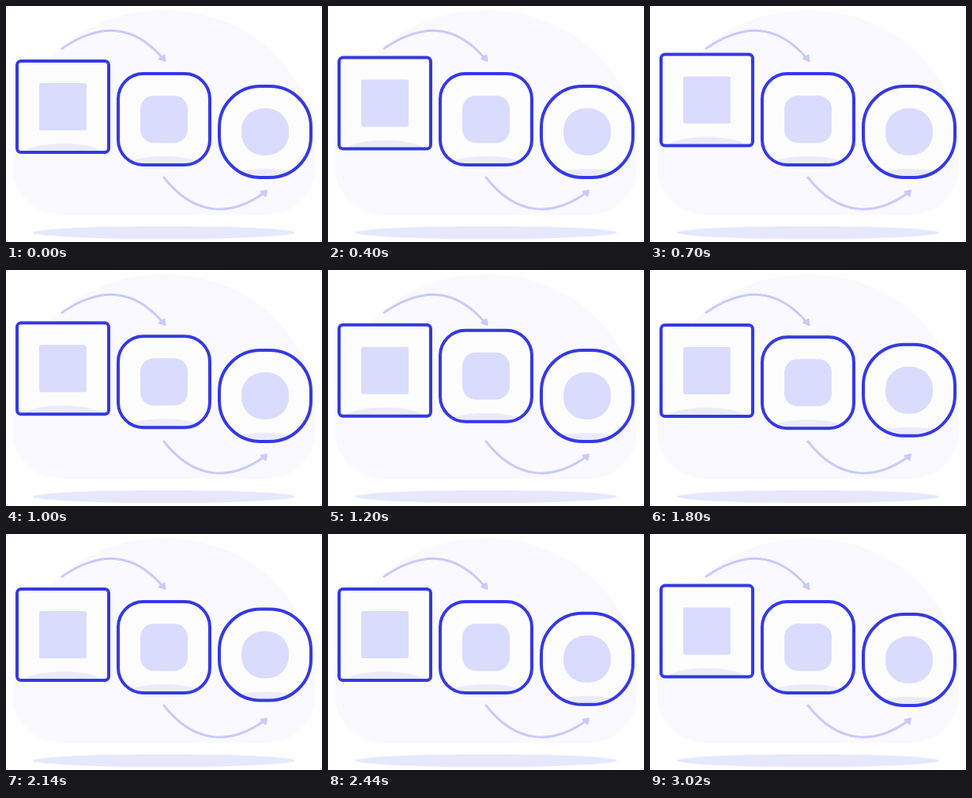
Recreate the animation shown at these times as an HTML page with a canvas. Size 400 px wide and 300 px high, loop 3.04 s.

```html
<!DOCTYPE html>
<html lang="en">
<head>
<meta charset="utf-8">
<title>Corner radius steps</title>
<style>
  html, body { margin: 0; width: 100%; height: 100%; overflow: hidden; background: #fff; }
  canvas { display: block; }
</style>
</head>
<body>
<canvas width="400" height="300"></canvas>
<script>
const ctx = document.querySelector('canvas').getContext('2d');

const LOOP = 3040, CYCLE = 2620, STAGGER = 667;
const RISE = 222, PEAK = 608, REST = 1298, LIFT = 10;

const tiles = [
  { x: 12, y: 68, outer: 5, inner: 3 },
  { x: 140, y: 84, outer: 32, inner: 17 },
  { x: 268, y: 100, outer: 52, inner: 28 }
];

function bezier(x1, y1, x2, y2) {
  const at = (a, b, s) => 3 * a * s * (1 - s) ** 2 + 3 * b * s * s * (1 - s) + s ** 3;
  return x => {
    let lo = 0, hi = 1;
    for (let i = 0; i < 24; i++) {
      const mid = (lo + hi) / 2;
      if (at(x1, x2, mid) < x) lo = mid; else hi = mid;
    }
    return at(y1, y2, lo);
  };
}
const easeUp = bezier(0.42, 0, 0.58, 1);
const easeDown = bezier(0.33, 0.3, 0.6, 1);

function lift(t) {
  if (t < RISE || t > REST) return 0;
  if (t < PEAK) return LIFT * easeUp((t - RISE) / (PEAK - RISE));
  return LIFT * (1 - easeDown((t - PEAK) / (REST - PEAK)));
}

function fill(path, color) {
  ctx.fillStyle = color;
  ctx.fill(path);
}

function ellipse(x, y, rx, ry) {
  const p = new Path2D();
  p.ellipse(x, y, rx, ry, 0, 0, 2 * Math.PI);
  return p;
}

function square(x, y, size, r) {
  const p = new Path2D();
  p.roundRect(x, y, size, size, r);
  return p;
}

const blob = new Path2D(
  'M9 180A191 175 0 0 1 391 180V205A60 60 0 0 1 331 265H69A60 60 0 0 1 9 205Z');
const arrows = [
  ['M71 54C118 22 160 22 198 66', 'M201.5 70L194 67L200.5 62.5Z'],
  ['M200 218C238 267 284 268 326 238', 'M330 234.5L322.5 236L328.5 241.5Z']
].map(pair => pair.map(d => new Path2D(d)));

function drawArrow([line, head]) {
  ctx.strokeStyle = '#c9cafc';
  ctx.lineCap = ctx.lineJoin = 'round';
  ctx.lineWidth = 3;
  ctx.stroke(line);
  ctx.lineWidth = 2;
  ctx.stroke(head);
  fill(head, '#c9cafc');
}

function drawTile({ x, y, outer, inner }, up) {
  const frame = square(2, 2, 116, outer);
  ctx.save();
  ctx.translate(x, y - up);
  fill(frame, '#fdfdfe');
  ctx.save();
  ctx.clip(frame);
  fill(ellipse(60, 120, 50, 13), '#ebebfb');
  ctx.restore();
  fill(square(30, 30, 60, inner), '#dadcfe');
  ctx.strokeStyle = '#3539e3';
  ctx.lineWidth = 4;
  ctx.stroke(frame);
  ctx.restore();
}

const start = performance.now();

function draw() {
  const t = (performance.now() - start) % LOOP;
  ctx.clearRect(0, 0, 400, 300);
  fill(blob, '#f9f9ff');
  fill(ellipse(200, 288, 166, 8), '#e7e8fe');
  arrows.forEach(drawArrow);
  tiles.forEach((tile, i) => drawTile(tile, lift((t - i * STAGGER + CYCLE) % CYCLE)));
  requestAnimationFrame(draw);
}
draw();
</script>
</body>
</html>
```
